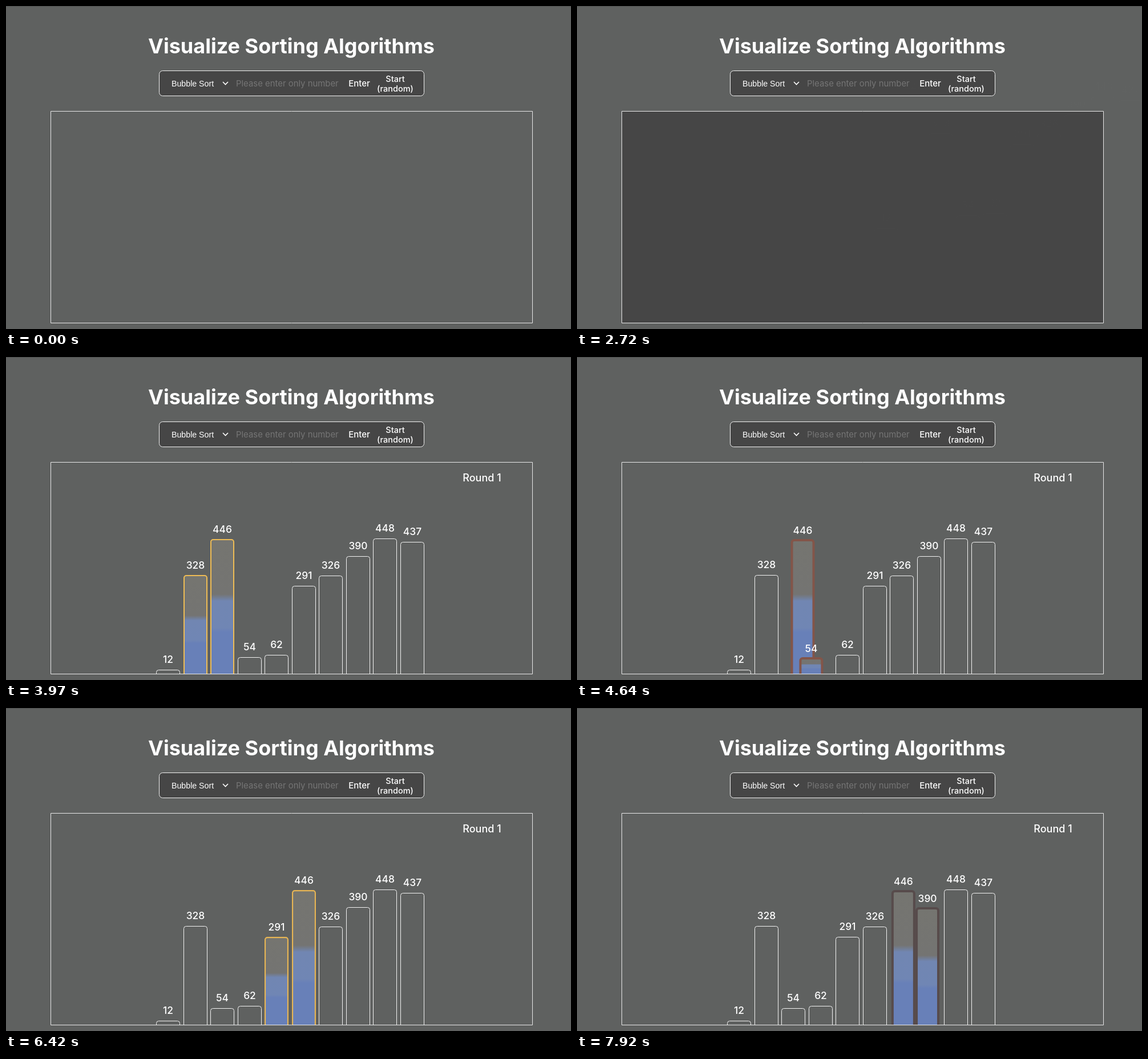
An HTML page with a canvas for the animation above (7.99 s loop, 990 px wide and 566 px high).

```html
<!DOCTYPE html>
<html lang="en">
<head>
<meta charset="utf-8">
<title>Visualize Sorting Algorithms</title>
<style>
  html, body { margin: 0; width: 100%; height: 100%; overflow: hidden; background: #5f6160; }
  canvas { display: block; }
</style>
</head>
<body>
<canvas id="stage" width="990" height="566"></canvas>
<script>
const ctx = document.getElementById('stage').getContext('2d');
const LOOP = 7990, FLOOR = 555, BAR_WIDTH = 42;
const CLICK = 2450, INTRO = 2720, COMPARE = 3310, FIRST_SWAP = 3490, PERIOD = 830;
const PAGE = [95, 97, 96], DARK = [70, 70, 70], LINE = '#f2f2f2';
const VALUES = [12, 446, 328, 54, 62, 291, 326, 390, 448, 437];
const COOL = [[0, '#757570'], [.41, '#747472'], [.46, '#7186b2'], [.66, '#7086b4'], [.69, '#6880b8'], [1, '#6880b8']];
const WARM = [[0, '#a44a47'], [.085, '#a8504c'], [.17, '#b05a54'], [.39, '#b4695f'], [.678, '#b56e62'], [.682, '#d8af62'], [1, '#d8af62']];

// Rows of time, then values to interpolate
const CURSOR = [
  [460, 957, 9], [1210, 637, 139], [1280, 637, 139], [1550, 627, 139], [1800, 627, 139],
  [1850, 624, 138], [1900, 624, 138], [2035, 627, 139], [2060, 627, 139],
  [2250, 664, 125], [2350, 664, 125], [2720, 992, 150]
];
// Age of the highlight, border width, red, green, blue
const BORDER = [
  [0, 1, 242, 242, 242], [140, 4, 95, 97, 96], [270, 4, 80, 70, 74],
  [310, 4, 107, 87, 77], [325, 4, 140, 84, 71], [450, 2, 238, 188, 85]
];

const clamp = u => Math.min(1, Math.max(0, u));
const smooth = u => u * u * (3 - 2 * u);
const mix = (a, b, u) => a.map((v, i) => v + (b[i] - v) * u);
const rgb = c => `rgb(${c.map(Math.round).join(',')})`;

function sample(rows, t, ease = u => u) {
  const next = rows.findIndex(row => row[0] > t);
  if (next === 0) return rows[0].slice(1);
  if (next < 0) return rows[rows.length - 1].slice(1);
  const a = rows[next - 1], b = rows[next];
  return mix(a, b, ease((t - a[0]) / (b[0] - a[0]))).slice(1);
}

function text(str, x, y, font, color = '#fff', align = 'center') {
  ctx.font = font;
  ctx.fillStyle = color;
  ctx.textAlign = align;
  ctx.textBaseline = 'alphabetic';
  ctx.fillText(str, x, y);
}

function box(x, y, w, h, radius, fill, stroke, lineWidth = 1) {
  ctx.beginPath();
  ctx.roundRect(x + lineWidth / 2, y + lineWidth / 2, w - lineWidth, h - lineWidth, radius);
  if (fill) { ctx.fillStyle = fill; ctx.fill(); }
  ctx.strokeStyle = stroke;
  ctx.lineWidth = lineWidth;
  ctx.stroke();
}

function drawPage(panelColor) {
  ctx.fillStyle = rgb(PAGE);
  ctx.fillRect(0, 0, 990, 566);
  ctx.fillStyle = '#4e5050';
  ctx.fillRect(0, 0, 990, 1);
  text('Visualize Sorting Algorithms', 500, 83, '700 36px Inter, sans-serif');

  box(268, 113, 465, 45, 6, rgb(DARK), LINE);
  text('Bubble Sort', 290, 141, '14.2px "Liberation Sans", sans-serif', '#fff', 'left');
  ctx.beginPath();
  ctx.moveTo(380, 133);
  ctx.lineTo(384.5, 137.5);
  ctx.lineTo(389, 133);
  ctx.strokeStyle = '#fff';
  ctx.lineWidth = 1.6;
  ctx.stroke();
  text('Please enter only number', 403, 141, '400 14.9px Inter, sans-serif', '#757575', 'left');
  text('Enter', 619, 141, '500 15px Inter, sans-serif');
  text('Start', 682, 133, '500 14.5px Inter, sans-serif');
  text('(random)', 682, 150, '500 14.5px Inter, sans-serif');

  box(78, 184, 845, 372, 0, rgb(panelColor), '#e8e8e8');
}

function drawBar(value, slot, age, stops) {
  const lit = age !== undefined;
  let x = 263.2 + 47.5 * slot;
  if (Number.isInteger(slot)) x = Math.round(x);
  const top = Math.round(554.5 - .527 * value);
  const [width, ...color] = lit ? sample(BORDER, age) : [1];
  let fill;
  if (lit) {
    fill = ctx.createLinearGradient(0, top, 0, FLOOR);
    for (const [at, c] of stops) fill.addColorStop(at, c);
  }
  ctx.save();
  ctx.beginPath();
  ctx.rect(0, 0, 990, FLOOR);
  ctx.clip();
  box(x, top, BAR_WIDTH, FLOOR - top + 8, [4, 4, 0, 0], fill, lit ? rgb(color) : LINE, width);
  ctx.restore();
  text(value, x + BAR_WIDTH / 2, top - 13 + width, '500 17.4px Inter, sans-serif');
}

function drawBars(t) {
  const order = [...VALUES];
  const swaps = Math.floor((t - FIRST_SWAP) / PERIOD);
  for (let i = 0; i < swaps; i++) [order[i + 1], order[i + 2]] = [order[i + 2], order[i + 1]];

  let left = -1, age, shift = 0, stops = WARM;
  if (swaps >= 0) {
    left = swaps + 1;
    age = t - FIRST_SWAP - swaps * PERIOD;
    shift = smooth(clamp((age - 258) / 160));
    stops = COOL;
  } else if (t >= COMPARE) {
    left = 0;
    age = t - COMPARE;
  }
  const isLit = i => left >= 0 && (i === left || i === left + 1);

  const away = (1 - clamp((t - INTRO) / 400)) ** 3;
  ctx.save();
  ctx.globalAlpha = 1 - away;
  ctx.translate(260 * away, -160 * away);
  order.forEach((value, i) => { if (!isLit(i)) drawBar(value, i); });
  if (left >= 0) {
    drawBar(order[left], left + shift, age, stops);
    drawBar(order[left + 1], left + 1 - shift, age, stops);
  }
  ctx.restore();
}

function drawCursor(t) {
  const [x, y] = sample(CURSOR, t, smooth);
  ctx.save();
  ctx.translate(x, y);
  ctx.beginPath();
  for (const p of [[0, 0], [0, 17], [4, 13.3], [6.7, 19], [9.4, 17.8], [6.8, 12.2], [12, 12.2]]) ctx.lineTo(...p);
  ctx.closePath();
  ctx.fillStyle = '#fff';
  ctx.fill();
  ctx.strokeStyle = '#333';
  ctx.lineWidth = .6;
  ctx.stroke();
  ctx.restore();
}

function draw(t) {
  const dark = t < CLICK ? 0 : 1 - clamp((t - FIRST_SWAP) / 400);
  drawPage(mix(PAGE, DARK, dark));
  if (t >= INTRO) drawBars(t);
  if (t >= COMPARE) text('Round 1', 834, 218, '500 18px Inter, sans-serif');
  if (t >= 460 && t < 2720) drawCursor(t);
}

const start = performance.now();
function frame() {
  draw((performance.now() - start) % LOOP);
  requestAnimationFrame(frame);
}
frame();
</script>
</body>
</html>
```
